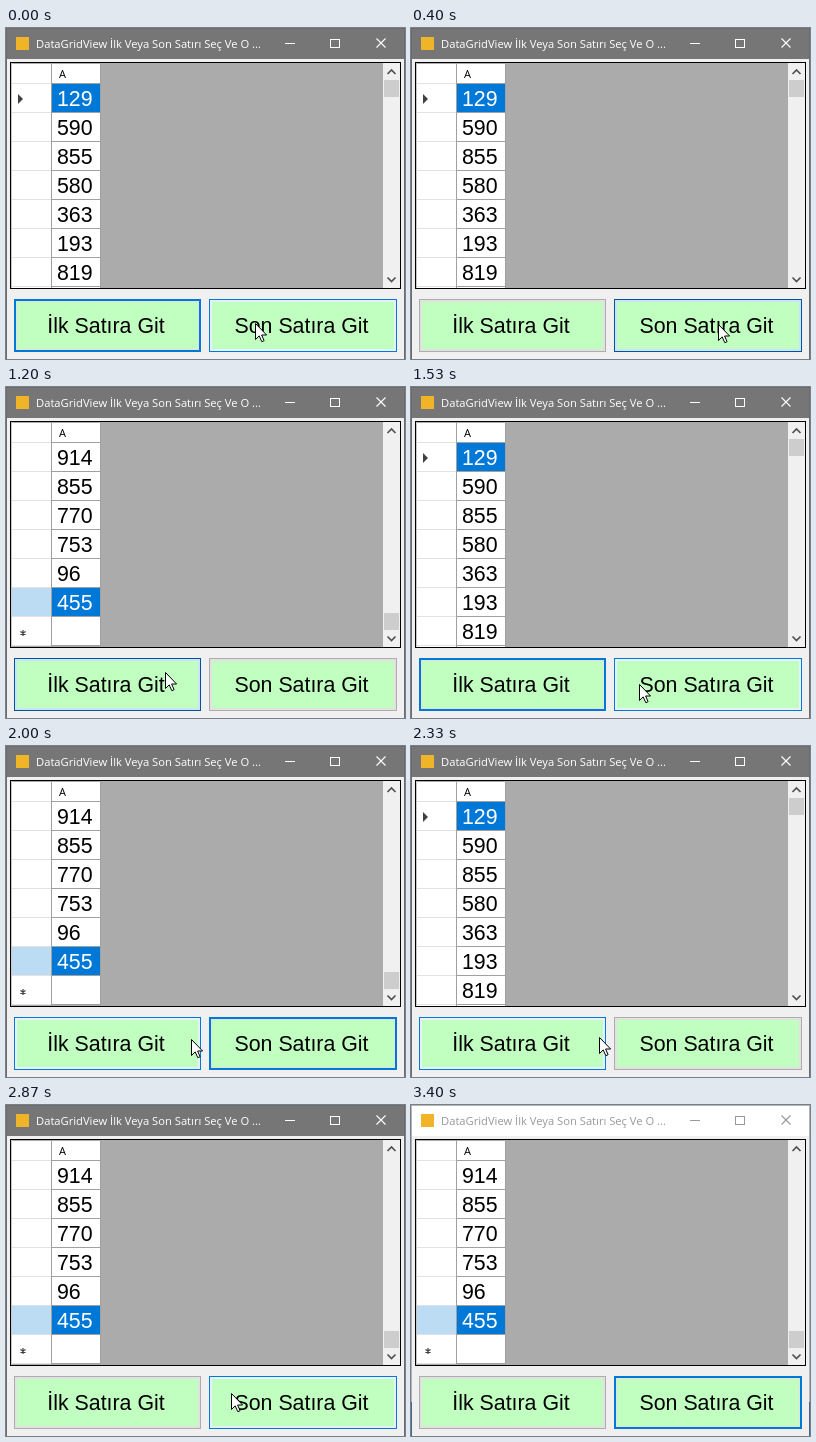
An HTML page for the animation above (3590 ms loop, 399 px wide and 331 px high).

```html
<!DOCTYPE html>
<html lang="tr">
<head>
<meta charset="utf-8">
<style>
html, body { margin: 0; width: 100%; height: 100%; overflow: hidden; background: #f0f0f0; }
svg { display: block; width: 399px; height: 331px; }
text { font-family: "Liberation Sans", Arial, sans-serif; font-size: 21.33px; white-space: pre; }
.caption { font: 11.2px "Open Sans", "Noto Sans", sans-serif; }
.head { font-size: 11px; font-family: "Open Sans", sans-serif; }
.crisp { shape-rendering: crispEdges; }
</style>
</head>
<body>
<svg id="stage" viewBox="0 0 399 331" xmlns="http://www.w3.org/2000/svg"></svg>
<script>
const stage = document.getElementById("stage");
const LOOP = 3590;
const BLUE = "#0078d7";
const LINE = "#a0a0a0";

function add(parent, tag, attrs = {}, content) {
  const el = document.createElementNS("http://www.w3.org/2000/svg", tag);
  for (const key in attrs) el.setAttribute(key, attrs[key]);
  if (content !== undefined) el.textContent = content;
  parent.append(el);
  return el;
}
const group = (parent = stage) => add(parent, "g");
const rect = (parent, x, y, width, height, fill) =>
  add(parent, "rect", { x, y, width, height, fill, class: "crisp" });
const label = (parent, x, y, content, attrs = {}) =>
  add(parent, "text", { x, y, ...attrs }, content);
const show = (el, on) => el.setAttribute("visibility", on ? "visible" : "hidden");

function buildWindow(bar, ink, edge) {
  const g = group();
  rect(g, 0, 0, 399, 31, bar);
  for (const x of [0, 398]) rect(g, x, 0, 1, 331, edge);
  rect(g, 0, 0, 399, 1, edge);
  rect(g, 10, 9, 13, 13, "#f0b429");
  label(g, 30, 19.5, "DataGridView İlk Veya Son Satırı Seç Ve O ...", { class: "caption", fill: ink });
  rect(g, 279, 15, 10, 1, ink);
  add(g, "rect", { x: 324.5, y: 11.5, width: 9, height: 8, fill: "none", stroke: ink, class: "crisp" });
  add(g, "path", { d: "M370.5 10.5l9 9m0-9l-9 9", stroke: ink, fill: "none", "stroke-width": 1.1 });
  return g;
}

function buildRows(values, selected) {
  const g = group();
  values.forEach((value, i) => {
    const y = 56 + i * 29;
    const height = Math.min(29, 260 - y);
    const on = i === selected;
    rect(g, 6, y, 39, height, on && i > 0 ? "#bcdcf4" : "#fff");
    rect(g, 46, y, 48, height, on ? BLUE : "#fff");
    rect(g, 45, y, 1, height, LINE);
    rect(g, 94, y, 1, height, LINE);
    if (height === 29) {
      rect(g, 6, y + 28, 39, 1, "#e2e2e2");
      rect(g, 46, y + 28, 49, 1, LINE);
    }
    label(g, 51, y + 22, value, { fill: on ? "#fff" : "#000" });
  });
  return g;
}

function buildScrollThumb(y, height, parent) {
  rect(parent, 378, y, 15, height, "#cdcdcd");
}

// Border styles: normal, default (focused), hover, pressed
const STYLES = {
  N: ["#adadad", 1, "#e1e1e1"],
  D: [BLUE, 2, "#e1e1e1"],
  H: [BLUE, 1, "#e5f1fb"],
  P: ["#005499", 1, "#cce4f7"]
};

function buildButton(x, width, caption) {
  const outer = rect(stage, x, 271, width, 53, "");
  const gap = rect(stage, x, 271, width, 53, "");
  rect(stage, x + 3, 274, width - 6, 47, "#c0ffc0");
  label(stage, x + width / 2 - 1.5, 305, caption, { "text-anchor": "middle" });
  return style => {
    const [border, inset, fill] = STYLES[style];
    outer.setAttribute("fill", border);
    const box = { x: x + inset, y: 271 + inset, width: width - 2 * inset, height: 53 - 2 * inset, fill };
    for (const key in box) gap.setAttribute(key, box[key]);
  };
}

rect(stage, 0, 0, 399, 331, "#f0f0f0");
const active = buildWindow("#767676", "#fff", "#6c6c6c");
const inactive = buildWindow("#fff", "#999", "#b4b4b4");
for (const x of [0, 398]) rect(inactive, x, 297, 1, 34, "#45658f");

// Grid frame and header
rect(stage, 4, 34, 391, 227, "#000");
rect(stage, 5, 35, 389, 225, "#ababab");
rect(stage, 5, 35, 1, 225, "#c8c8c8");
rect(stage, 6, 36, 88, 20, "#fff");
rect(stage, 6, 55, 39, 1, "#e2e2e2");
rect(stage, 46, 55, 49, 1, LINE);
rect(stage, 45, 36, 1, 20, LINE);
rect(stage, 94, 36, 1, 20, LINE);
label(stage, 53, 50, "A", { class: "head" });

// Scroll bar
rect(stage, 377, 35, 17, 225, "#f0f0f0");
for (const d of ["M381.5 46l4-4 4 4", "M381.5 249.500l4 4 4-4"])
  add(stage, "path", { d, fill: "none", stroke: "#505050", "stroke-width": 1.7 });

const first = buildRows(["129", "590", "855", "580", "363", "193", "819", ""], 0);
add(first, "path", { d: "M12 66v10l5-5z", fill: "#404040" });
buildScrollThumb(52, 17, first);

const last = buildRows(["914", "855", "770", "753", "96", "455", ""], 5);
add(last, "path", { d: "M17 243v6m-2.600-4.500l5.200 3m0-3l-5.200 3", stroke: "#404040", "stroke-width": 1.2 });
rect(last, 6, 259, 89, 1, "#ababab");
buildScrollThumb(226, 17, last);

const setFirst = buildButton(8, 187, "İlk Satıra Git");
const setLast = buildButton(203, 188, "Son Satıra Git");
const cursor = add(stage, "path", {
  d: "M.5.5v16l3.700-3.600 2.600 5.800 2.300-1-2.500-5.700h5z",
  fill: "#fff", stroke: "#000", "stroke-width": 1
});

// time, cursor x, cursor y, grid at end, styles of both buttons
const steps = [
  [0, 249, 295, 0, "DH"],
  [70, 285, 296, 0, "DH"],
  [130, 307, 296, 0, "DH"],
  [400, 307, 296, 0, "NP"],
  [530, 307, 296, 1, "NH"],
  [600, 272, 293, 1, "NH"],
  [670, 218, 289, 1, "NH"],
  [730, 175, 286, 1, "HD"],
  [800, 159, 285, 1, "HD"],
  [1200, 159, 285, 1, "PN"],
  [1400, 159, 285, 0, "HN"],
  [1470, 198, 293, 0, "DN"],
  [1530, 228, 297, 0, "DH"],
  [1600, 231, 297, 0, "DH"],
  [1670, 231, 297, 0, "NP"],
  [1800, 231, 297, 1, "NH"],
  [1870, 214, 295, 1, "NH"],
  [1930, 192, 293, 1, "HD"],
  [2000, 185, 293, 1, "HD"],
  [2070, 184, 292, 1, "HD"],
  [2130, 184, 292, 1, "PN"],
  [2270, 184, 292, 0, "HN"],
  [2330, 188, 291, 0, "HN"],
  [2400, 206, 289, 0, "DH"],
  [2470, 218, 288, 0, "DH"],
  [2530, 224, 288, 0, "DH"],
  [2600, 226, 288, 0, "DH"],
  [2670, 226, 288, 0, "NP"],
  [2800, 226, 288, 1, "NH"],
  [2870, 225, 288, 1, "NH"],
  [2930, 184, 310, 1, "HD"],
  [3000, 162, 325, 1, "ND"],
  [3130, 150, 340, 1, "ND"]
];

function draw(now) {
  const t = now % LOOP;
  const [, x, y, atEnd, styles] = steps.findLast(step => step[0] <= t);
  show(first, !atEnd);
  show(last, atEnd);
  show(active, t < 3400);
  show(inactive, t >= 3400);
  setFirst(styles[0]);
  setLast(styles[1]);
  cursor.setAttribute("transform", `translate(${x} ${y})`);
}

const start = performance.now();
function tick() {
  draw(performance.now() - start);
  requestAnimationFrame(tick);
}
tick();
</script>
</body>
</html>
```
